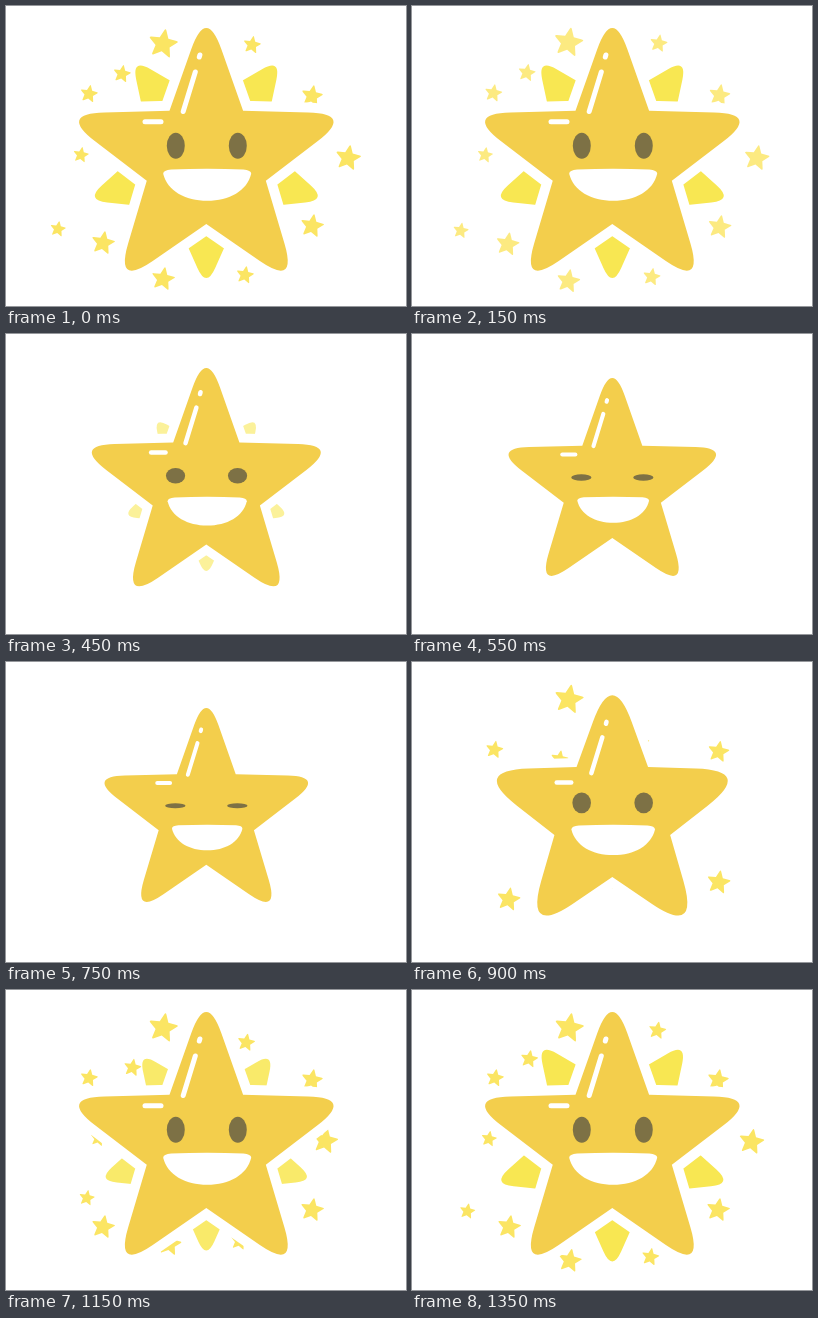
An HTML page with a canvas that plays this animation: 400x300 px, repeating every 1400 ms.

```html
<!DOCTYPE html>
<html lang="en">
<head>
<meta charset="utf-8">
<title>Happy star</title>
<style>
  html, body { margin: 0; width: 100%; height: 100%; overflow: hidden; background: #fff; }
  canvas { display: block; }
</style>
</head>
<body>
<canvas id="stage" width="400" height="300"></canvas>
<script>
const ctx = document.getElementById('stage').getContext('2d');
const LOOP = 1400, STEP = 50, CX = 200.3;
const GOLD = '#f3ce4c', LEMON = '#f8e752', SPARK = '#fbe563', OLIVE = '#7d7145';

// Resting places: x, y, radius
const nearSparks = [[157, 38, 15], [83, 88, 9], [306, 90, 11], [97, 237, 12], [306, 220, 12]];
const farSparks = [
  [116, 68, 9], [246, 39, 9], [342, 152, 13], [75, 149, 8], [52, 223, 8], [157, 273, 12], [239, 269, 9]
];

const clamp = u => Math.min(1, Math.max(0, u));
const span = (t, a, b) => clamp((t - a) / (b - a));
const easeInOut = u => (1 - Math.cos(Math.PI * u)) / 2;
const easeOutBack = u => 1 + 2.7 * (u - 1) ** 3 + 1.7 * (u - 1) ** 2;

// Five-pointed star; each corner at `outer` is rounded off so that it ends at `tip`
function star(x, y, outer, inner, tip, tilt = 0) {
  const at = (k, r) => {
    const a = (tilt / 180 + k / 5 - 0.5) * Math.PI;
    return [x + r * Math.cos(a), y + r * Math.sin(a)];
  };
  const cut = 2 * (outer - tip) / (outer - inner * Math.cos(Math.PI / 5));
  ctx.beginPath();
  for (let k = 0; k < 10; k += 2) {
    const corner = at(k, outer), before = at(k - 1, inner), after = at(k + 1, inner);
    const toward = p => corner.map((c, i) => c + (p[i] - c) * cut);
    ctx.lineTo(...before);
    ctx.lineTo(...toward(before));
    ctx.quadraticCurveTo(...corner, ...toward(after));
  }
  ctx.closePath();
}

function fill(color) {
  ctx.fillStyle = color;
  ctx.fill();
}

function line(x1, y1, x2, y2) {
  ctx.beginPath();
  ctx.moveTo(x1, y1);
  ctx.lineTo(x2, y2);
  ctx.stroke();
}

function spark([x, y, r], reach) {
  star(200 + (x - 200) * reach, 146 + (y - 146) * reach, r * 1.08, r * 0.5, r, 10);
  fill(SPARK);
}

function drawSparks(t) {
  const leaving = t < LOOP / 2;
  ctx.globalAlpha = leaving ? 1 - span(t, 100, 362) : span(t, 780, 840);
  // Thrown outwards, slowing down, and falling back after the loop point
  const flight = leaving ? t + LOOP : t;
  const gap = (0.00101 * (1520 - flight)) ** 2 - 0.015;
  for (const s of nearSparks) spark(s, leaving ? 1 - gap : easeOutBack(span(t, 750, 1150)));
  for (const s of farSparks) spark(s, 1 - gap * (Math.hypot(s[0] - 200, s[1] - 146) / 115) ** 1.2);
  ctx.globalAlpha = 1;
}

function drawRays(t, shrink) {
  const hidden = t < LOOP / 2 ? shrink : (1 - span(t, 780, LOOP)) ** 2;
  const reach = 1 - 0.6 * hidden;
  ctx.globalAlpha = reach ** 1.5;
  star(CX, 155, 127 * reach, 59.6 * reach, 117 * reach, 36);
  fill(LEMON);
  ctx.globalAlpha = 1;
}

function drawBody(t, scale) {
  const fat = Math.sin(Math.PI * span(t, 780, 1020));
  ctx.save();
  ctx.translate(CX, 141.6);
  ctx.scale(scale, scale);
  ctx.translate(-CX, -141.6);
  star(CX, 155.5, 155 + 8 * fat, 62.6 + 4.5 * fat, 133.5);
  ctx.strokeStyle = '#fff';
  ctx.lineWidth = 20;
  ctx.stroke();
  fill(GOLD);
  ctx.translate(0, 2.5 * fat);
  ctx.lineCap = 'round';
  ctx.lineWidth = 5;
  line(193.3, 51, 193.9, 49);
  line(189.3, 66, 177.2, 105.5);
  line(139, 115.8, 155, 115.8);
  ctx.restore();
}

function drawFace(closed) {
  for (const x of [169.8, 231.8]) {
    ctx.beginPath();
    ctx.ellipse(x - 0.5 * closed, 139.8 + 4 * closed, 9 + 1.2 * closed, 13 - 10.5 * closed, 0, 0, 2 * Math.PI);
    fill(OLIVE);
  }
  ctx.save();
  ctx.translate(201.2, 162.7);
  ctx.scale(1 - 0.2 * closed, 1 - 0.2 * closed);
  ctx.beginPath();
  ctx.moveTo(-44, 5);
  ctx.quadraticCurveTo(-44, 1.5, -36, 0.8);
  ctx.quadraticCurveTo(0, -0.8, 36, 0.8);
  ctx.quadraticCurveTo(44, 1.5, 44, 5);
  ctx.bezierCurveTo(40, 22, 22, 32, 0, 32);
  ctx.bezierCurveTo(-22, 32, -40, 22, -44, 5);
  fill('#fff');
  ctx.restore();
}

function draw(now) {
  const t = Math.floor(now % LOOP / STEP) * STEP;
  const shrink = easeInOut(span(t, 294, 606));
  ctx.fillStyle = '#fff';
  ctx.fillRect(0, 0, 400, 300);
  drawSparks(t);
  drawRays(t, shrink);
  drawBody(t, 1 - 0.2 * (shrink - easeInOut(span(t, 775, 1015))));
  drawFace(shrink - easeInOut(span(t, 780, 960)));
}

let start;
function loop(now) {
  start ??= now;
  draw(now - start);
  requestAnimationFrame(loop);
}
draw(0);
requestAnimationFrame(loop);
</script>
</body>
</html>
```
